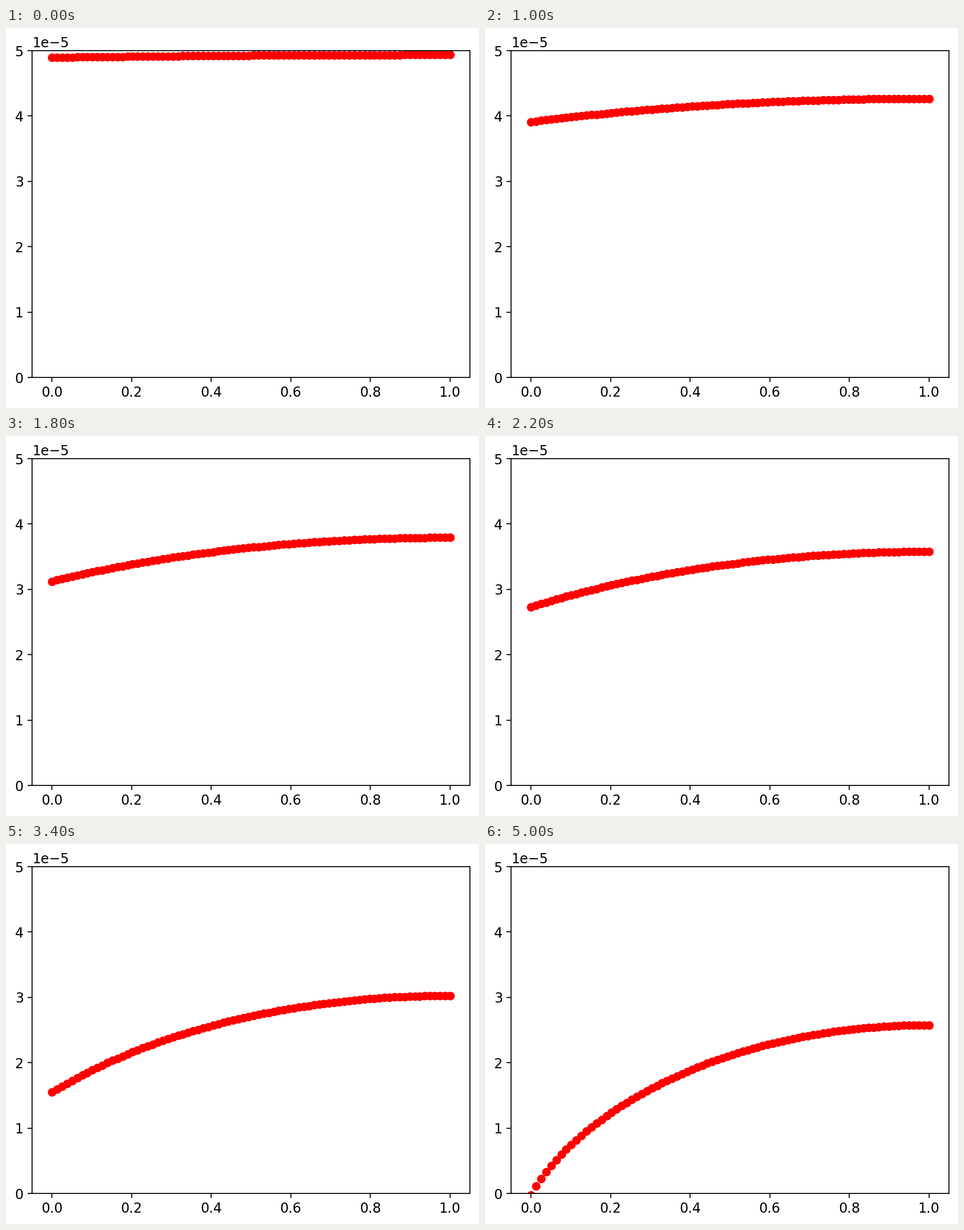
Animation, 835 px wide and 671 px high, one loop 5100 ms. Source, as a matplotlib script:

```python
import numpy as np
import matplotlib.pyplot as plt
from matplotlib.animation import FuncAnimation

W, H, DPI = 835, 671, 156
FRAMES, INTERVAL = 51, 100
POINTS = 80
UNIT = 1e-5
REST = 5.0

plt.rcParams.update({"font.family": "DejaVu Sans", "font.size": 11})

x = np.linspace(0, 1, POINTS)
step = x[1]

# Level at the closed right end, sampled over time and smoothed.
right_level = np.poly1d(np.polyfit(
    [0, 6, 12, 18, 24, 30, 36, 42, 48, 50],
    [4.935, 4.525, 4.144, 3.790, 3.477, 3.195, 2.950, 2.754, 2.610, 2.578],
    4))


def left_level(i):
    return 4.895 - 0.0984 * i


def march(right, k):
    """Integrate c'' = -k (REST - c) / c from the flat right end to x = 0."""
    c = np.empty(POINTS)
    c[-1] = right
    slope = 0.0
    for j in range(POINTS - 1, 0, -1):
        bend = step ** 2 * k * (REST - c[j]) / max(c[j], 0.02)
        slope += bend / 2 if j == POINTS - 1 else bend
        c[j - 1] = c[j] - slope
    return c


def profile(i):
    """Find the strength k that makes the curve meet the left level."""
    left, right = left_level(i), right_level(i)
    low, high = 1.0, 12.0
    for _ in range(30):
        k = (low + high) / 2
        c = march(right, k)
        if c[0] > left:
            low = k
        else:
            high = k
    c[0] = left
    return c * UNIT


curves = [profile(i) for i in range(FRAMES)]

fig = plt.figure(figsize=((W + 1e-3) / DPI, (H + 1e-3) / DPI), dpi=DPI,
                 facecolor="white")
ax = fig.add_axes([46 / W, (H - 617) / H, 773 / W, 577 / H])
ax.set_xlim(-0.05, 1.05)
ax.set_ylim(0, 5 * UNIT)
dots, = ax.plot(x, curves[0], "ro")


def update(i):
    dots.set_ydata(curves[i])
    return dots,


anim = FuncAnimation(fig, update, frames=FRAMES, interval=INTERVAL,
                     repeat=True, repeat_delay=0, blit=False)
plt.show()
```
